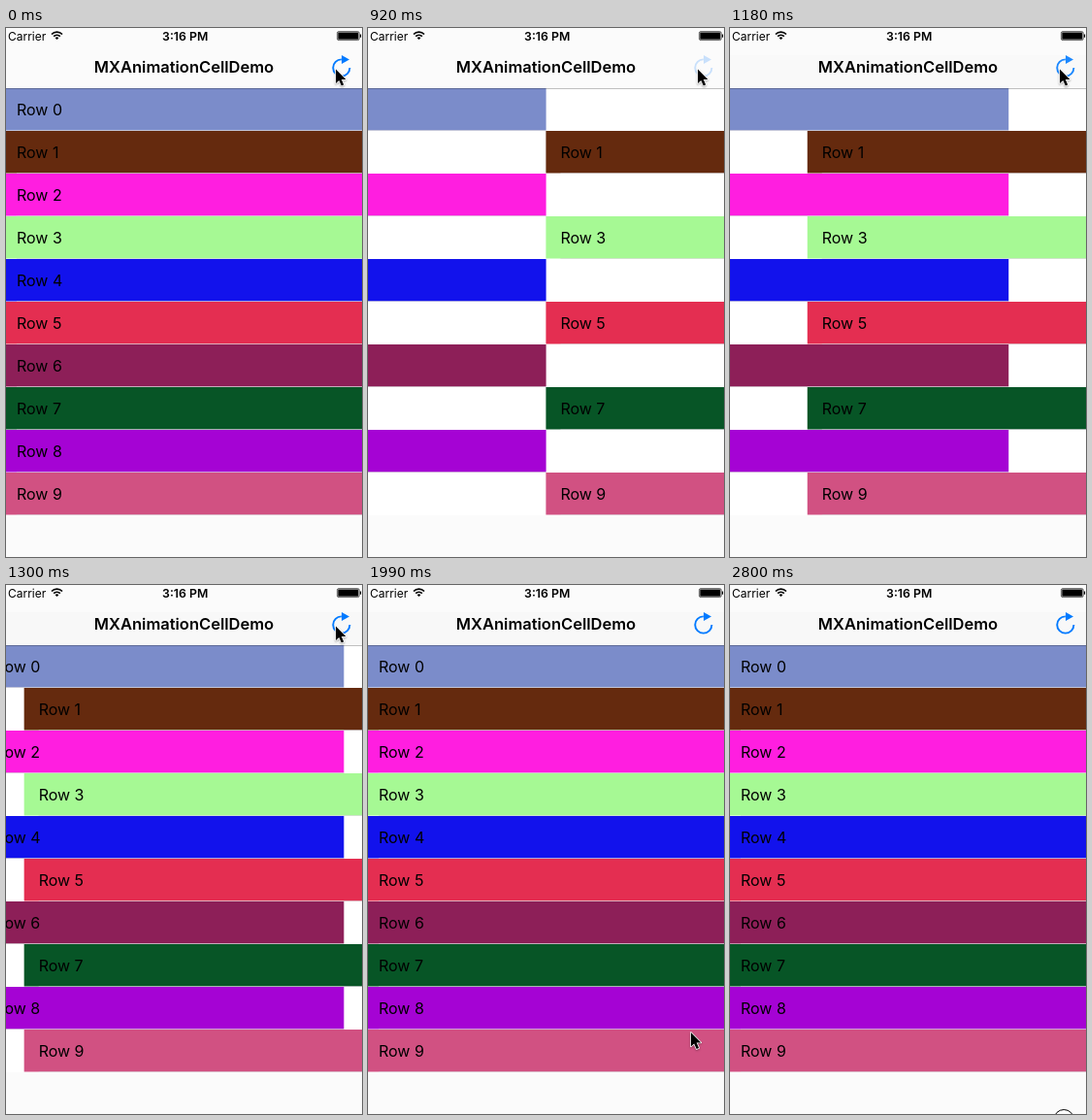
These frames come from a looping animation (367x545 px, 2.9 s). An HTML page with a canvas:

```html
<!DOCTYPE html>
<html lang="en">
<head>
<meta charset="utf-8">
<title>MXAnimationCellDemo</title>
<style>
html, body { margin: 0; width: 100%; height: 100%; overflow: hidden; background: #fbfbfb; }
canvas { display: block; width: 367px; height: 545px; }
</style>
</head>
<body>
<canvas id="stage"></canvas>
<script>
const W = 367, H = 545, LOOP = 2900;
const ROW_TOP = 62, ROW_H = 44, CELL_X = -4, CELL_W = 375;
const COLORS = ['#7b8cca', '#652a0e', '#ff1ee0', '#a6f994', '#1212ec',
                '#e42e51', '#8d1f58', '#075526', '#a503d4', '#d15182'];

// The screen refreshes only at these moments, plus every 30 ms while the pointer moves.
const TICKS = [0, 850, 920, 980, 1040, 1110, 1180, 1240, 1300, 1360, 1450];
for (let t = 1750; t <= 2200; t += 30) TICKS.push(t);
TICKS.push(2770, 2800);

const canvas = document.getElementById('stage');
const ctx = canvas.getContext('2d');
const dpr = window.devicePixelRatio || 1;
canvas.width = W * dpr;
canvas.height = H * dpr;
ctx.scale(dpr, dpr);

const clamp = v => Math.max(0, Math.min(1, v));
const easeInOut = u => (1 - Math.cos(Math.PI * clamp(u))) / 2;

function rect(x, y, w, h, color) {
  ctx.fillStyle = color;
  ctx.fillRect(x, y, w, h);
}

function text(str, x, y, size, weight = 400, align = 'left') {
  ctx.font = `${weight} ${size}px Inter, "Open Sans", sans-serif`;
  ctx.textAlign = align;
  ctx.fillStyle = '#000';
  ctx.fillText(str, x, y);
}

function polygon(points) {
  ctx.beginPath();
  points.forEach(([x, y]) => ctx.lineTo(x, y));
  ctx.closePath();
}

function arc(x, y, r, from, to, width, color) {
  ctx.beginPath();
  ctx.arc(x, y, r, from, to);
  ctx.lineWidth = width;
  ctx.strokeStyle = color;
  ctx.stroke();
}

function drawRows(shift) {
  rect(0, ROW_TOP, W, ROW_H * COLORS.length, '#fff');
  COLORS.forEach((color, i) => {
    const x = CELL_X + (i % 2 ? shift : -shift);
    const y = ROW_TOP + i * ROW_H;
    rect(x, y, CELL_W, ROW_H - 0.5, color);
    rect(x + 15, y + ROW_H - 0.5, CELL_W - 15, 0.5, '#c8c7cc');
    text('Row ' + i, x + 15, y + 28, 16);
  });
}

function drawStatus() {
  text('Carrier', 2, 12.5, 12);
  text('3:16 PM', 184.7, 12.5, 12.3, 600, 'center');

  const up = -Math.PI / 2, spread = Math.PI / 4;
  for (const r of [4.7, 7.8]) arc(52.5, 12, r, up - spread, up + spread, 1.7, '#000');
  ctx.beginPath();
  ctx.moveTo(52.5, 12);
  ctx.arc(52.5, 12, 2.6, up - spread, up + spread);
  ctx.fillStyle = '#000';
  ctx.fill();

  ctx.lineWidth = 0.6;
  ctx.strokeStyle = '#000';
  ctx.beginPath();
  ctx.roundRect(341.4, 3.6, 22.8, 9, 1.6);
  ctx.stroke();
  rect(342.3, 4.5, 21, 7.2, '#000');
  rect(364.9, 6.5, 1.2, 3.2, '#000');
}

function drawRefresh(alpha) {
  const blue = '#007aff';
  ctx.globalAlpha = alpha;
  arc(345.8, 41, 8.6, 0, Math.PI * 1.5, 1.9, blue);
  polygon([[346, 28], [354, 32.4], [346, 37]]);
  ctx.fillStyle = blue;
  ctx.fill();
  ctx.globalAlpha = 1;
}

function drawPointer(x, y) {
  ctx.save();
  ctx.translate(x, y);
  polygon([[0, 0], [0, 14.5], [3.3, 11.4], [5.8, 17], [8.2, 16], [5.8, 10.5], [10.4, 10.5]]);
  ctx.shadowColor = 'rgba(0,0,0,.35)';
  ctx.shadowBlur = 2 * dpr;
  ctx.shadowOffsetY = dpr;
  ctx.lineJoin = 'round';
  ctx.lineWidth = 1.6;
  ctx.strokeStyle = '#fff';
  ctx.stroke();
  ctx.shadowColor = 'transparent';
  ctx.fillStyle = '#000';
  ctx.fill();
  ctx.restore();
}

function pointerAt(t) {
  const f = 1 - (1 - clamp((t - 1720) / 480)) ** 2.1;
  return t < 1750 ? [340, 42.5] : [340 + 3 * f - 66 * f * (1 - f), 42.5 + 508 * f];
}

function draw(t) {
  const started = t >= 920;
  const slide = started ? easeInOut((t - 913) / 500) : 1;
  const barTone = started ? 251 - 3 * slide : 251;

  rect(0, 0, W, H, '#fbfbfb');
  drawRows(CELL_W / 2 * (1 - slide));
  rect(0, 28, W, ROW_TOP - 28, `rgb(${barTone},${barTone},${barTone})`);
  rect(0, ROW_TOP, W, 1, 'rgba(0,0,0,.25)');
  drawStatus();
  text('MXAnimationCellDemo', 183.5, 46, 16.5, 600, 'center');
  drawRefresh(started ? 0.2 + 0.8 * clamp((t - 920) / 300) : 1);

  const [x, y] = pointerAt(t);
  const pressed = t >= 850 && t < 920 || t >= 2770;
  if (pressed) {
    ctx.globalAlpha = t === 2770 ? 0.6 : 1;
    arc(x + 1.2, y + 0.3, 10.3, 0, Math.PI * 2, 1, '#000');
    ctx.globalAlpha = 1;
  }
  drawPointer(x, y);
}

const start = performance.now();
function frame() {
  const t = (performance.now() - start) % LOOP;
  draw(TICKS.findLast(tick => tick <= t) ?? 0);
  requestAnimationFrame(frame);
}
frame();
</script>
</body>
</html>
```
